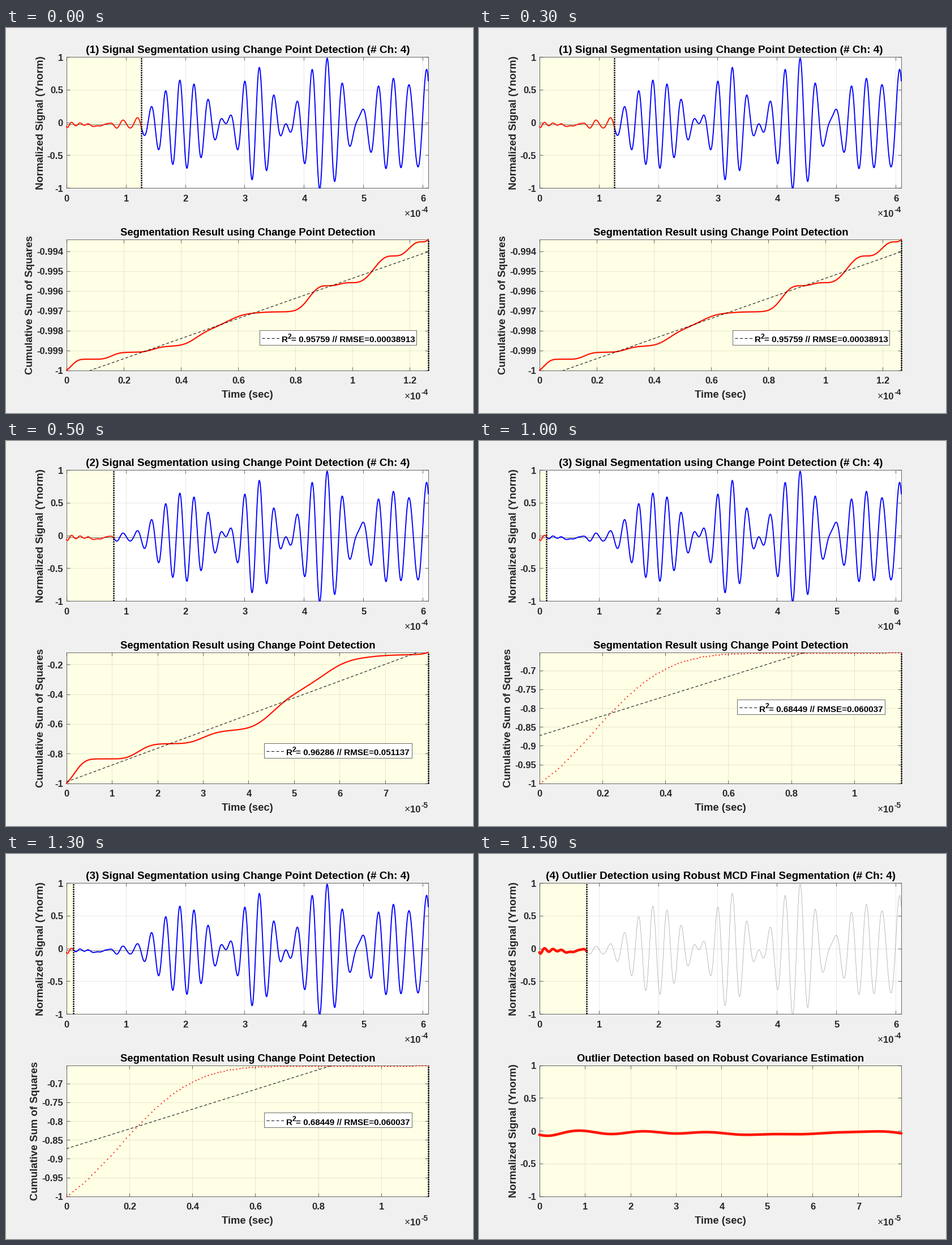
A matplotlib script for the animation above (2000 ms loop, 825x679 px).

```python
import numpy as np
import matplotlib.pyplot as plt
from matplotlib.animation import FuncAnimation
from matplotlib.patches import Rectangle

W, H, DPI = 825, 679, 64
PT = 72 / DPI  # points per pixel
THIN = 0.67 * PT
LEFT, RIGHT = 106.7, 746.2
UPPER, LOWER = (51.2, 282.2), (372.7, 603.7)  # top and bottom edge of each plot
SPAN = 609.6  # microseconds

BACK, CREAM, INK = "#f0f0f0", "#ffffe5", "#262626"
RED, BLUE, GRAY = "#ff1400", "#0000ff", "#9c9c9c"

plt.rcParams["font.family"] = "Liberation Sans"

# Wave bursts: height, centre, width, time of one crest, period
BURSTS = [
    (.05, 88, 14, 96.3, 24),
    (.68, 197, 56, 191, 24),
    (.89, 320, 38, 300, 25),
    (1.03, 435, 47, 439.2, 25.6),
    (.70, 547, 55, 525.5, 25.2),
    (.88, 615, 30, 607.5, 26.5),
]


def bell(t, centre, width):
    return np.exp(-((t - centre) / width) ** 2)


def wave(t, crest, period):
    return np.cos(2 * np.pi * (t - crest) / period)


def sample(t):
    """Fading ripple on a slightly negative base, then overlapping bursts."""
    base = -.026 - .014 * bell(t, 2, 2.5) - .033 * bell(t, 50, 10)
    ripple = .038 * np.exp(-t / 32) * wave(t, 8.9, 14.2)
    bursts = sum(a * bell(t, c, w) * wave(t, crest, period)
                 for a, c, w, crest, period in BURSTS)
    return np.clip(base + ripple + bursts, -1, 1)


time = np.arange(0, SPAN, 0.1)
signal = sample(time)

NORM = "Normalized Signal (Ynorm)"
SEGMENT = dict(head="Signal Segmentation using Change Point Detection",
               sub="Segmentation Result using Change Point Detection",
               ylabel="Cumulative Sum of Squares")
OUTLIER = dict(head="Outlier Detection using Robust MCD Final Segmentation",
               sub="Outlier Detection based on Robust Covariance Estimation",
               ylabel=NORM)

# cut: end of the quiet part; top: upper limit of the lower plot
SCENES = [
    dict(SEGMENT, cut=126.5, xstep=20, power=4, top=-.9934, ystep=.001,
         label_x=47, fit=(-1.00043, -.99402), box_y=533,
         note="= 0.95759 // RMSE=0.00038913"),
    dict(SEGMENT, cut=79.5, xstep=10, power=5, top=-.118, ystep=.2,
         label_x=65.5, fit=(-.9905, -.0914), box_y=533,
         note="= 0.96286 // RMSE=0.051137"),
    dict(SEGMENT, cut=11.5, xstep=2, power=5, top=-.6518, ystep=.05,
         label_x=56.5, fit=(-.8734, -.5718), box_y=456,
         note="= 0.68449 // RMSE=0.060037"),
    dict(OUTLIER, cut=79.5, xstep=10, power=5, top=1, ystep=.5,
         label_x=65.5, fit=None),
]

fig = plt.figure(figsize=(W / DPI, H / DPI), dpi=DPI, facecolor=BACK)


def add_plot(edges):
    top, bottom = edges
    return fig.add_axes([LEFT / W, 1 - bottom / H, (RIGHT - LEFT) / W, (bottom - top) / H])


upper, lower = add_plot(UPPER), add_plot(LOWER)
page = fig.add_axes([0, 0, 1, 1], zorder=5)  # pixel coordinates, y downwards


def put(x, y, text, size, ha="center", color=INK, weight="bold", **kw):
    page.text(x, y, text, fontsize=size * PT, ha=ha, va="baseline",
              color=color, weight=weight, **kw)


def trace(ax, x, y, color, width):
    """A row of dots, drawn as a line where the dots run together."""
    if len(x) < 200 and ax is lower:
        style = dict(ls="none", marker="o", ms=width * PT, mew=0)
    else:
        style = dict(lw=width * PT, solid_capstyle="round", solid_joinstyle="round")
    ax.plot(x, y, color=color, clip_on=False, zorder=3, **style)


def dotted(ax, x):
    ax.axvline(x, color="black", lw=2.5 * PT, ls=(0, (1, .65)),
               zorder=4, clip_on=False)


def frame_plot(ax, edges, xmax, xstep, power, top_value, ystep, ylabel, label_x):
    """Limits, grid, ticks and every label around one plot."""
    top, bottom = edges
    xticks = np.arange(0, xmax, xstep)
    yticks = np.arange(-1, top_value + 1e-9, ystep)
    ax.set(xlim=(0, xmax), ylim=(-1, top_value), xticks=xticks, yticks=yticks)
    ax.set_axisbelow(True)
    ax.grid(color=INK, alpha=.15, lw=THIN)
    ax.tick_params(direction="in", length=6.4 * PT, width=THIN, color=INK,
                   top=True, right=True, labelbottom=False, labelleft=False)
    for spine in ax.spines.values():
        spine.set(linewidth=THIN, edgecolor=INK)

    unit = 10 ** (6 - power)
    for v in xticks:
        put(LEFT + .6 + (RIGHT - LEFT) * v / xmax, bottom + 23.5, f"{v / unit:g}", 16.67)
    for v in yticks:
        y = bottom - (bottom - top) * (v + 1) / (top_value + 1)
        put(101, y + 6.5, f"{v:g}", 16.67, "right")
    put(709, bottom + 51, "\u00d7", 17.5, weight="normal")
    put(732.5, bottom + 51, "10", 16.67, "right")
    put(746, bottom + 43, f"-{power}", 13.7, "right")
    put(label_x, (top + bottom) / 2, ylabel, 18.5, rotation=90,
        rotation_mode="anchor")


def legend(y, note):
    width = 54 + 8 * len(note)
    x = 587 - width / 2
    page.add_patch(Rectangle((x + .3, y + .3), width - 1, 26, fc="white",
                             ec=INK, lw=THIN))
    page.plot([x + 4, x + 35], [y + 13.5] * 2, color="black", lw=PT,
              ls=(0, (5, 3.5)))
    put(x + 39, y + 21.5, "R", 15.2, "left", "black")
    put(x + 50, y + 15, "2", 12.2, "left", "black")
    put(x + 56.5, y + 21.5, note, 15.2, "left", "black")


def draw(i):
    scene = SCENES[i]
    for ax in (upper, lower, page):
        ax.clear()
    page.set(xlim=(0, W), ylim=(H, 0))
    page.axis("off")

    cut, top, fit = scene["cut"], scene["top"], scene["fit"]
    inside = time <= cut
    t, y = time[inside], signal[inside]

    frame_plot(upper, UPPER, SPAN, 100, 4, 1, .5, NORM, 65.5)
    frame_plot(lower, LOWER, cut, scene["xstep"], scene["power"], top,
               scene["ystep"], scene["ylabel"], scene["label_x"])
    put(427, 44.5, f"({i + 1}) {scene['head']} (# Ch: 4)", 19, color="black")
    put(427, 366.5, scene["sub"], 18.5, color="black")
    put(426.5, 651.5, "Time (sec)", 18.5)

    upper.axvspan(0, cut, color=CREAM, lw=0, zorder=.1)
    lower.set_facecolor(CREAM)
    dotted(upper, cut)

    if fit:
        energy = np.cumsum(y ** 2)
        energy = (energy - energy[0]) / (energy[-1] - energy[0])
        upper.axhline(-.03, color=INK, lw=THIN, zorder=2)
        trace(upper, time[~inside], signal[~inside], BLUE, 1.9)
        trace(upper, t, y, RED, 1.9)
        trace(lower, t, -1 + (top + 1) * energy, RED, 2.2)
        lower.plot([0, cut], fit, color="black", lw=PT, ls=(0, (5, 3.5)), zorder=3.5)
        dotted(lower, cut)
        legend(scene["box_y"], scene["note"])
    else:
        upper.plot(time, signal, color=GRAY, lw=THIN)
        trace(upper, t, y, RED, 4.6)
        trace(lower, t, y, RED, 4.6)


anim = FuncAnimation(fig, draw, frames=len(SCENES), interval=500, repeat=True)
plt.show()
```
